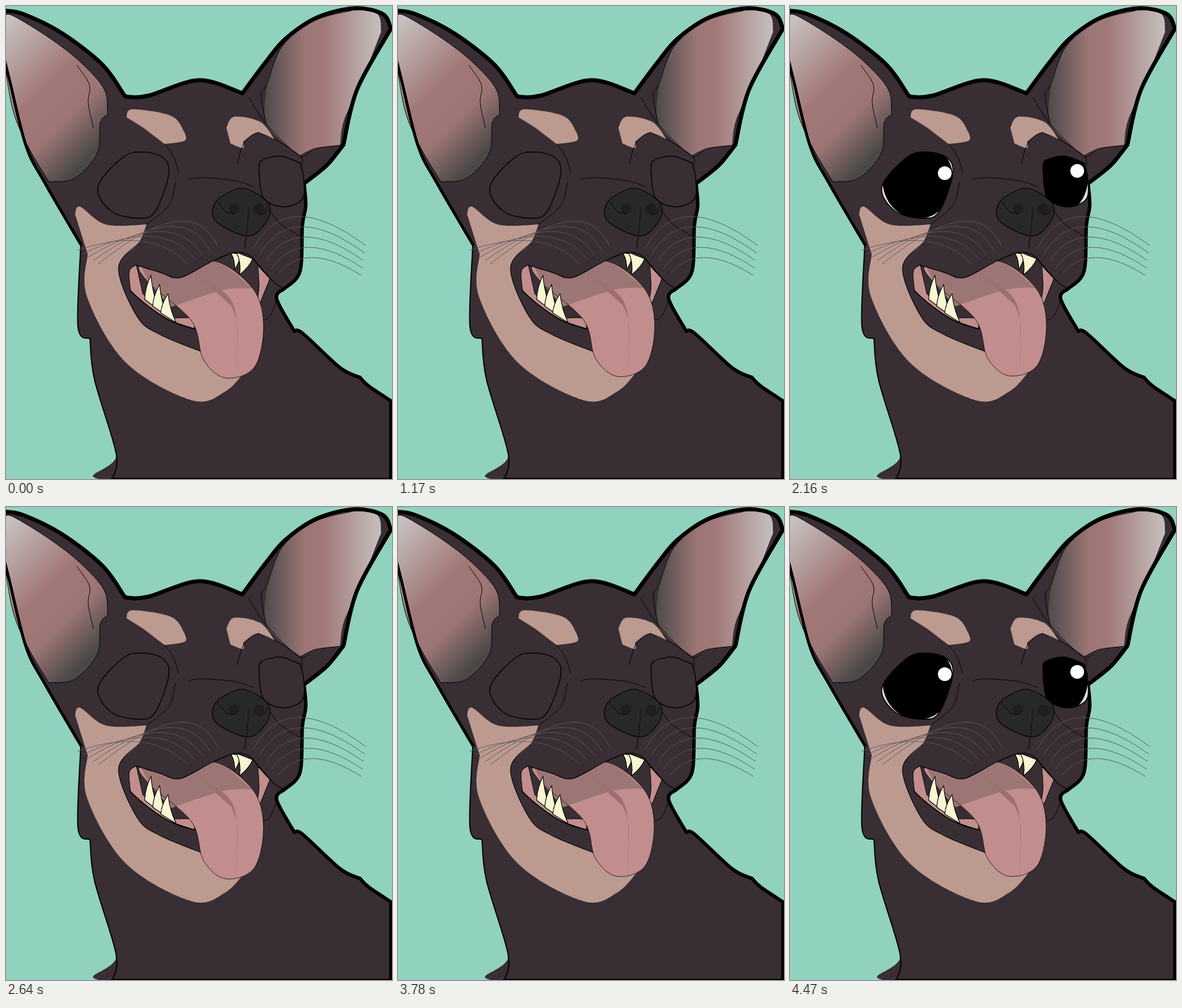
Recreate the animation shown at these times as an HTML page. Size 676 by 829 pixels, loop 4.5 s.

```html
<!DOCTYPE html>
<html lang="en">
<head>
<meta charset="utf-8">
<title>Panting dog</title>
<style>
  html, body { margin: 0; width: 100%; height: 100%; overflow: hidden; background: #90d2be; }
  svg { display: block; width: 676px; height: 829px; }
</style>
</head>
<body>
<svg id="stage" viewBox="0 0 676 829" stroke-linejoin="round" stroke-linecap="round">
  <defs>
    <linearGradient id="earL" gradientUnits="userSpaceOnUse" x1="0" y1="30" x2="190" y2="220">
      <stop offset="0" stop-color="#c6c0be"/><stop offset=".48" stop-color="#a07877"/>
      <stop offset=".72" stop-color="#9c7675"/><stop offset="1" stop-color="#4a4847"/>
    </linearGradient>
    <linearGradient id="earR" gradientUnits="userSpaceOnUse" x1="455" y1="0" x2="657" y2="0">
      <stop offset="0" stop-color="#4f4c4b"/><stop offset=".34" stop-color="#9c7675"/>
      <stop offset=".5" stop-color="#a07877"/><stop offset="1" stop-color="#c6c0be"/>
    </linearGradient>
  </defs>
</svg>
<script>
const SKIN = '#382e33', TAN = '#bc9a90', PINK = '#c18e8d', ROSE = '#9c7675', TOOTH = '#f8f6d2';
const stage = document.getElementById('stage');

function add(tag, attrs, parent = stage) {
  const el = document.createElementNS('http://www.w3.org/2000/svg', tag);
  for (const key in attrs) el.setAttribute(key, attrs[key]);
  return parent.appendChild(el);
}

// Spline through "x,y" key points; "|" makes a corner, a final "z" closes the shape.
function spline(spec) {
  const closed = spec.endsWith('z');
  const runs = spec.replace('z', '').split('|')
    .map(run => run.trim().split(/\s+/).map(p => p.split(',').map(Number)));
  const loop = closed && runs.length === 1;
  let d = 'M' + runs[0][0], last = null;
  for (const run of runs) {
    const pts = last ? [last, ...run] : run, n = pts.length;
    const at = i => loop ? pts[(i + n) % n] : pts[Math.max(0, Math.min(n - 1, i))];
    for (let i = 0; i < (loop ? n : n - 1); i++) {
      const [a, b, c, e] = [at(i - 1), at(i), at(i + 1), at(i + 2)];
      const c1 = [0, 1].map(k => b[k] + (c[k] - a[k]) / 6);
      const c2 = [0, 1].map(k => c[k] - (e[k] - b[k]) / 6);
      d += `C${c1} ${c2} ${c}`;
    }
    last = pts[n - 1];
  }
  return d + (closed ? 'Z' : '');
}
const path = (d, fill, stroke = 'none', width = 1, parent = stage) =>
  add('path', { d, fill, stroke, 'stroke-width': width }, parent);
const shape = (spec, ...style) => path(spline(spec), ...style);
const line = (spec, width = 1, color = '#000') => shape(spec, 'none', color, width);
const dot = (cx, cy, rx, ry, fill, parent = stage) => add('ellipse', { cx, cy, rx, ry, fill }, parent);

// Silhouette
const crown = '-4,8 30,14 97,47 168,102 205,153 | 213,159 250,157 338,130 414,153 | 455,98 490,57 545,20 610,4 ' +
  '660,14 674,40 | 615,146 591,243 | 562,279 522,311';
const flank = '522,311 525,350 519,385 515,465 488,495 | 474,513 505,570 | 520,574 585,634 620,651 | 635,666 674,692 | 674,832';
const neck = '185,832 193,785 155,655 147,583 | 126,562 131,418';
const cheek = '131,418 68,310 35,245 5,125 -4,90';
shape(`${crown} | ${flank} | ${neck} | ${cheek} z`, SKIN);

// Ears
shape('-3,18 12,17 76,56 130,98 172,146 178,190 | 165,205 160,258 120,302 75,308 | 38,245 12,182 -3,95 z', 'url(#earL)', '#000');
line('124,104 146,138 144,170 153,213');
shape('657,45 650,14 605,8 540,26 484,70 457,137 | 457,208 514,262 | 540,250 585,244 | 592,200 620,140 z', 'url(#earR)');
line('605,8 540,26 484,70 457,137 447,155 455,205');
line('425,160 457,208 514,262 540,250 585,244');

line(crown, 7);
line(flank, 6);
line(neck, 2);
line(cheek, 5);
line('185,828 674,828', 2);

// Brows and creases
shape('211,195 222,181 290,193 313,222 | 313,236 278,242 | 240,213 z', TAN);
shape('386,213 400,194 445,203 470,233 | 440,222 415,238 | 415,249 393,241 z', TAN);
line('278,242 294,265 302,292');
line('405,276 417,240 440,222 451,228');
line('470,233 514,262 519,280');
line('320,304 345,301 400,306 435,317');
line('297,309 285,350 247,382');
line('459,354 480,381 515,404');

// Tan muzzle
const chin = '232,416 197,460 230,545 270,576 345,607';
shape(`121,365 130,352 175,383 246,383 | ${chin} | 425,632 | 385,675 325,691 210,625 142,510 143,435 z`, TAN);
line(chin, 1.2);

// Nose
shape('366,345 400,322 425,322 459,345 458,375 425,403 368,378 z', '#282828', '#000', 1.3);
for (const x of [399, 443]) dot(x, 355.5, 9.5, 9.5, '#211c1e');
line('370,342 385,360 399,364');
line('443,366 452,363 458,352');
line('425,354 423,385 418,424', 2, '#1b1719');

// Mouth
const lip = '228,454 270,467 305,476 360,448 400,432 425,436 443,455';
const jaw = '218,499 245,523 285,550 330,566';
shape(`${lip} 462,478 | 437,530 | 330,566 | 285,550 218,499 | 216,465 z`, SKIN, '#000', 1.2);
shape(`228,454 216,465 218,499 | ${jaw} | 326,548 290,547 | 240,505 z`, PINK, '#000');
line(jaw, 1.8);
shape('441,455 | 462,478 | 446,518 | 437,528 | 443,495 441,455 z', PINK, '#000');

const tongue = add('g', {});
const root = '236,455 305,473 365,447 432,495';
const tongueEdge = `${root} 451,560 435,633 385,652 346,620 325,552 250,485 z`;
shape(tongueEdge, PINK, 'none', 0, tongue);
shape(`${root} | 380,498 288,528 | 250,485 z`, ROSE, 'none', 0, tongue);
shape('335,472 398,523 404,642 | 405,562 395,526 z', '#9c7072', 'none', 0, tongue);
shape(tongueEdge, 'none', '#000', .8, tongue);

// Upper lip hides the tongue root
shape(`${lip} | 400,420 305,455 z`, SKIN);
line(`${lip} 470,485 488,495`, 1.3);
line('474,516 462,544 450,550');

// Each tooth has two sides that bend the same way.
function tooth(ax, ay, tipX, tipY, bx, by, bend) {
  const side = (x, y) => `${(x + tipX) / 2 + bend} ${(y + tipY) / 2}`;
  path(`M${ax} ${ay}Q${side(ax, ay)} ${tipX} ${tipY}Q${side(bx, by)} ${bx} ${by}Z`, TOOTH, '#000', 1.2);
}
for (let i = 0; i < 3; i++)
  tooth(243 + 14 * i, 514 + 12 * i, 254 + 15 * i, 472 + 16 * i, 268 + 15 * i, 533 + 11 * i, -5);
tooth(394, 433, 400, 462, 410, 435, 5);
tooth(404, 432, 409, 471, 432, 443, 6);

// Eyes: closed lids below, open eyes above
const eyes = add('g', {});
function eye(id, outline, pupil, shineX, shineY) {
  const d = spline(outline);
  stage.insertBefore(path(d, SKIN, '#000', 1.5), eyes);
  add('path', { d }, add('clipPath', { id }));
  path(d, '#dedcdc', 'none', 0, eyes);
  dot(...pupil, '#000', eyes).setAttribute('clip-path', `url(#${id})`);
  path(d, 'none', '#000', 1.5, eyes);
  dot(shineX, shineY, 12, 12, '#fff', eyes);
}
eye('clipL', '161,317 205,265 240,256 275,266 285,295 262,359 235,372 185,360 z', [224, 305, 62, 68], 271, 293);
eye('clipR', '443,285 | 447,271 480,263 515,275 | 521,300 519,338 485,352 450,335 443,285 z', [476, 300, 46, 62], 503, 289);

// Whiskers fan out from both sides of the nose.
for (let i = 0; i < 5; i++) {
  const arcs = [
    `M${370 - 13 * i} ${420 + 8 * i}Q${325 - 18 * i} ${320 + 16 * i} ${162 - 9 * i} ${452 - 6 * i}`,
    `M${433 + 11 * i} ${425 + 11 * i}Q${490 + 9 * i} ${315 + 24 * i} ${630 - 2 * i} ${420 + 13 * i}`
  ];
  for (const d of arcs) path(d, 'none', '#5d575a');
}

// Each pant has a long and a short stretch; the eyes blink once per pant.
const LOOP = 4500, PANT = 1350;
const stretch = [1, 0, .4, 0, 1];

function draw() {
  const phase = performance.now() % LOOP % PANT / PANT;
  const step = Math.floor(phase * 4);
  const ease = (1 - Math.cos(Math.PI * (phase * 4 - step))) / 2;
  const level = stretch[step] + (stretch[step + 1] - stretch[step]) * ease;
  const scale = .975 + .025 * level;
  tongue.setAttribute('transform', `translate(343.5 447) scale(${scale}) translate(-343.5 -447)`);
  eyes.setAttribute('visibility', phase >= .11 && phase < .71 ? 'visible' : 'hidden');
  requestAnimationFrame(draw);
}
draw();
</script>
</body>
</html>
```
